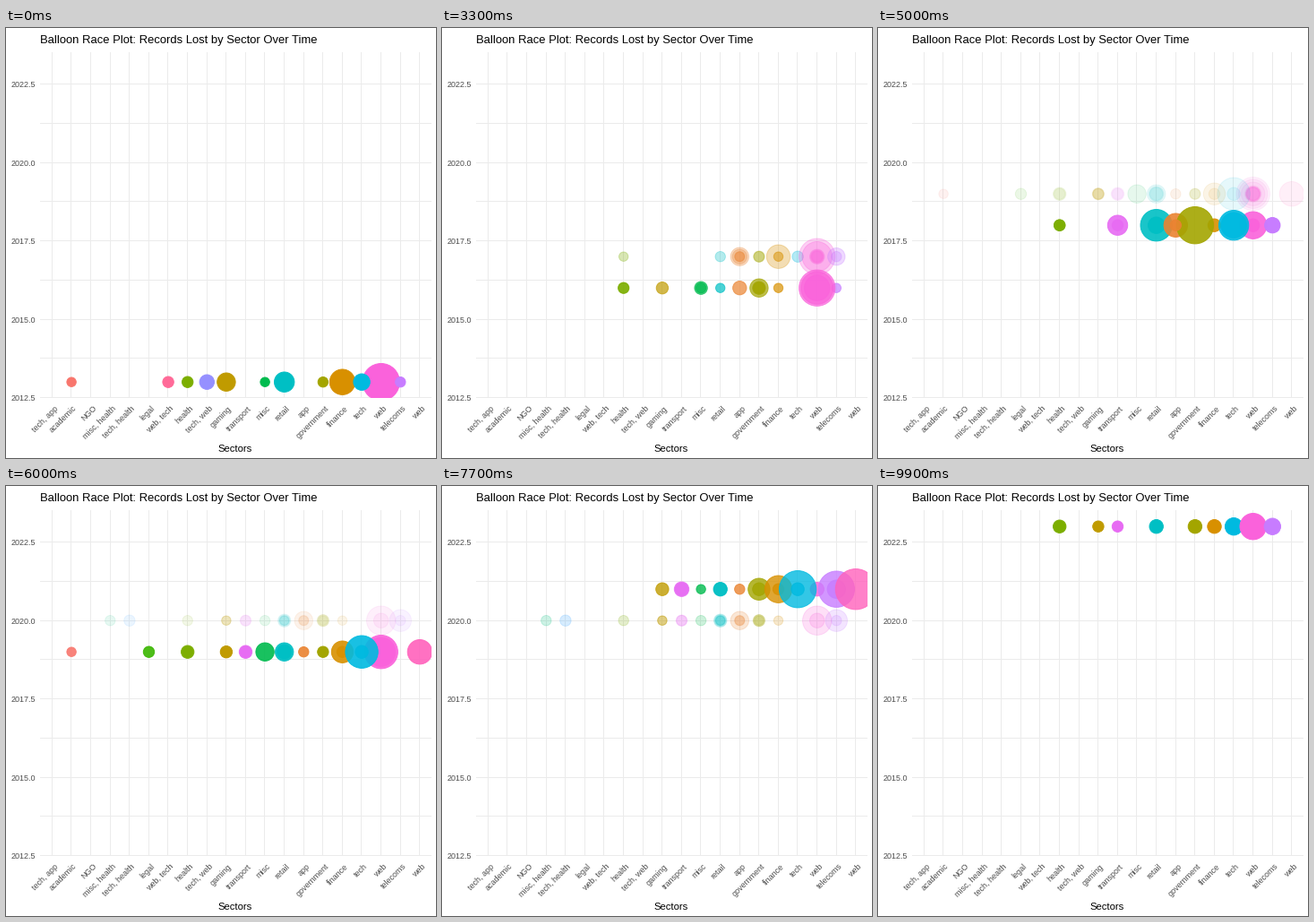
Recreate the animation shown at these times as a matplotlib script. Size 480 by 480 pixels, loop 10000 ms.

```python
import matplotlib.pyplot as plt
import numpy as np
from matplotlib.animation import FuncAnimation
from matplotlib.patches import Circle, Rectangle

SIZE, DPI, FRAMES = 480, 80, 100
PT = 72 / DPI  # points per pixel
LEFT, RIGHT, TOP, BOTTOM = 38, 475, 27, 413

SECTORS = ["tech, app", "academic", "NGO", "misc, health", "tech, health",
           "legal", "web, tech", "health", "tech, web", "gaming",
           "transport", "misc", "retail", "app", "government", "finance",
           "tech", "web", "telecoms", "web "]

COLORS = {
    "academic": "#F8766D", "app": "#EA8331", "finance": "#D89000",
    "gaming": "#C09B00", "government": "#A3A500", "health": "#7CAE00",
    "legal": "#39B600", "misc": "#00BB4E", "misc, health": "#00BF7D",
    "NGO": "#00C1A3", "retail": "#00BFC4", "tech": "#00BAE0",
    "tech, app": "#00B0F6", "tech, health": "#35A2FF",
    "tech, web": "#9590FF", "telecoms": "#C77CFF",
    "transport": "#E76BF3", "web": "#FA62DB", "web ": "#FF62BC",
    "web, tech": "#FF6A98",
}

# Balloon radii per sector, listed in drawing order
BALLOONS = {
    2013: "academic:6|web, tech:7|health:7|tech, web:9|gaming:11|misc:6"
          "|retail:12|finance:15 9|government:6.5|web:21.5 13 9|tech:10"
          "|telecoms:6.5",
    2014: "academic:6|health:7|transport:6.5 6|misc:8|retail:11 8 7"
          "|government:7|finance:12 11 8 7|web:14 7",
    2015: "tech, app:6|health:11.5 8.5 8 8 7|transport:6|app:6 6"
          "|government:8.5 6.5 6 6|finance:6|web:15 11.5 10 9 8 7"
          "|telecoms:8 6",
    2016: "health:7 6.5|gaming:7.5|misc:8 6.5|retail:6|app:8.5"
          "|government:11 8 7|finance:6|telecoms:6|web:21 19 15",
    2017: "health:6|retail:6.5|app:11 9 6.5 6|government:7 6.5"
          "|finance:14 6 6|tech:7|web:21 17.5 9 8 7|telecoms:10.5 6.5",
    2018: "health:7 7|transport:12 7|retail:18.5 10|app:14|finance:8"
          "|government:21.5|app:7|web:16 8|tech:17.5 15|telecoms:9.5 9",
    2019: "academic:6|legal:7|health:8 7|gaming:7.5 7 7 6.5|transport:8 7"
          "|misc:11|retail:11 9 8|app:6.5|government:7 6.5|finance:13 7"
          "|web:19.5 17 14 10 9 9 9 8 8 8|tech:19 8|web :14.5",
    2020: "misc, health:6.5|tech, health:7|health:6.5|gaming:6 6 6"
          "|transport:7 6.5|misc:6.5|retail:8 7 6 6|app:11 6.5 6"
          "|government:7.5 7 6|finance:6|web:17 9|telecoms:13 6.5",
    2021: "gaming:8|transport:9 8|misc:6|retail:8.5 8|app:6.5|web:8.5"
          "|government:13 8|finance:16 7|tech:21.5 8|telecoms:21 11"
          "|web :23.5",
    2022: "NGO:6|health:9 7|gaming:9|retail:7|app:10|government:27"
          "|finance:8|tech:8|web:12 8|telecoms:9",
    2023: "health:8|gaming:7|transport:7|retail:8.5|government:8.5"
          "|finance:8.5|tech:10.5|web:15.5|telecoms:10",
}
YEARS = sorted(BALLOONS)
# Each year is fully shown at its evenly spaced, rounded frame
KEYS = np.round(np.linspace(0, FRAMES - 1, len(YEARS)) - 0.01)


def year_y(year):
    return 45 + 35 * (2023 - year)


def sector_x(i):
    return 51.3 + 21.6 * i


def label(x, y, text, size, color="black", **kw):
    ax.text(x, y, text, fontsize=size * PT, color=color, **kw)


def grid(xs, ys):
    ax.plot(xs, ys, color="#EBEBEB", lw=PT, snap=False, zorder=0,
            solid_capstyle="butt")


def balloons(year):
    made = []
    for entry in BALLOONS[year].split("|"):
        name, radii = entry.split(":")
        center = sector_x(SECTORS.index(name)) + 0.2, year_y(year) + 0.2
        for r in radii.split():
            dot = Circle(center, float(r) - 0.8, color=COLORS[name],
                         lw=0.945 * PT, zorder=2)
            ax.add_patch(dot)
            dot.set_clip_path(panel)
            made.append(dot)
    return made


plt.rcParams["font.family"] = "Liberation Sans"
fig = plt.figure(figsize=(SIZE / DPI, SIZE / DPI), dpi=DPI, facecolor="white")
ax = fig.add_axes([0, 0, 1, 1])
ax.set(xlim=(0, SIZE), ylim=(SIZE, 0))
ax.axis("off")
panel = Rectangle((LEFT, TOP), RIGHT - LEFT, BOTTOM - TOP,
                  fc="none", ec="none")
ax.add_patch(panel)

for tick in np.arange(2012.5, 2023, 1.25):
    y = int(year_y(tick)) + 0.5
    grid([LEFT, RIGHT], [y, y])
    if tick % 2.5 == 0:
        label(33, y + 3.5, f"{tick:.1f}", 9, "#4D4D4D", ha="right")

for i, name in enumerate(SECTORS):
    x = int(sector_x(i)) + 0.5
    grid([x, x], [TOP, BOTTOM])
    label(x + 7, 425, name.strip(), 9, "#4D4D4D", ha="right",
          va="baseline", rotation=45, rotation_mode="anchor")

label(38, 17, "Balloon Race Plot: Records Lost by Sector Over Time", 13.05)
label(256, 473, "Sectors", 11.2, ha="center")

groups = [balloons(year) for year in YEARS]


def draw(frame):
    now = np.interp(frame, KEYS, range(len(YEARS)))
    for i, group in enumerate(groups):
        alpha = max(0.0, 1 - abs(now - i))
        for dot in group:
            dot.set_alpha(alpha)
            dot.set_visible(alpha > 0)
    return []


anim = FuncAnimation(fig, draw, frames=FRAMES, interval=100,
                     repeat=True, repeat_delay=0)
plt.show()
```
